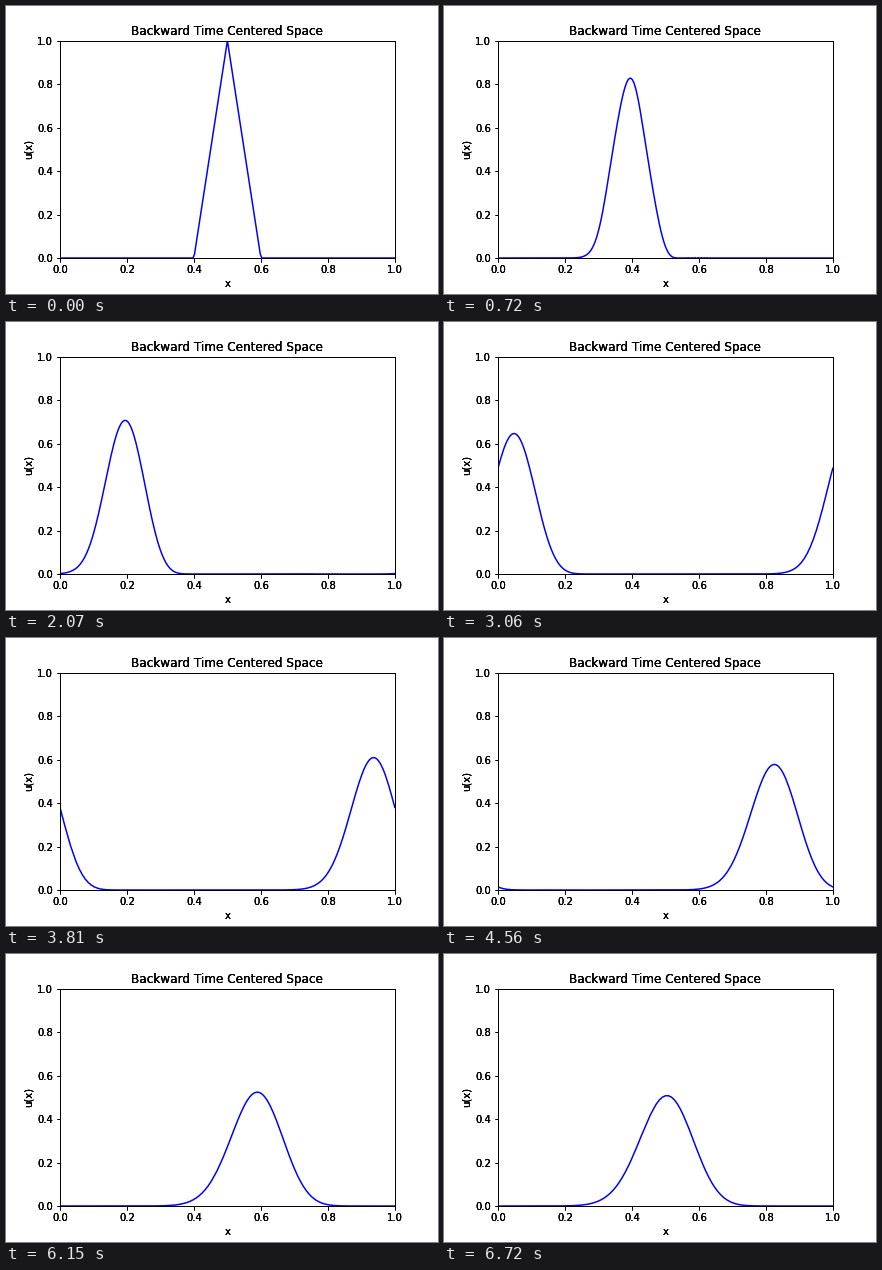
These frames come from a looping animation (432x288 px, 6.75 s). A matplotlib script:

```python
import numpy as np
import matplotlib.pyplot as plt
from matplotlib.animation import FuncAnimation

FRAMES, INTERVAL = 225, 30
CELLS = 224          # periodic grid cells on [0, 1]
COURANT = -1.0       # the pulse travels left, once round per loop
LAYERS = 3           # stacked axes give the text its heavy edges

plt.rcParams["font.family"] = "DejaVu Sans"


def solve():
    """Advect a triangular pulse with the implicit BTCS scheme."""
    x = np.linspace(0, 1, CELLS + 1)
    u = np.maximum(0, 1 - 10 * np.abs(x[:-1] - 0.5))
    eye = np.eye(CELLS)
    centered = np.roll(eye, 1, axis=1) - np.roll(eye, -1, axis=1)
    step = np.linalg.inv(eye + COURANT / 2 * centered)
    history = []
    for _ in range(FRAMES):
        history.append(np.append(u, u[0]))
        u = step @ u
    return x, history


def add_axes(fig):
    ax = fig.add_axes([0.125, 0.125, 0.775, 0.755], facecolor="none")
    ax.set(xlim=(0, 1), ylim=(0, 1), xlabel="x", ylabel="u(x)")
    ax.set_title("Backward Time Centered Space", fontsize=12)
    return ax


x, history = solve()
fig = plt.figure(figsize=(6, 4), dpi=72, facecolor="white")
layers = [add_axes(fig) for _ in range(LAYERS)]
line, = layers[0].plot(x, history[0], color="blue", lw=1.5)


def update(i):
    line.set_ydata(history[i % FRAMES])
    return line,


anim = FuncAnimation(fig, update, frames=FRAMES, interval=INTERVAL,
                     repeat=True, repeat_delay=0)
plt.show()
```
